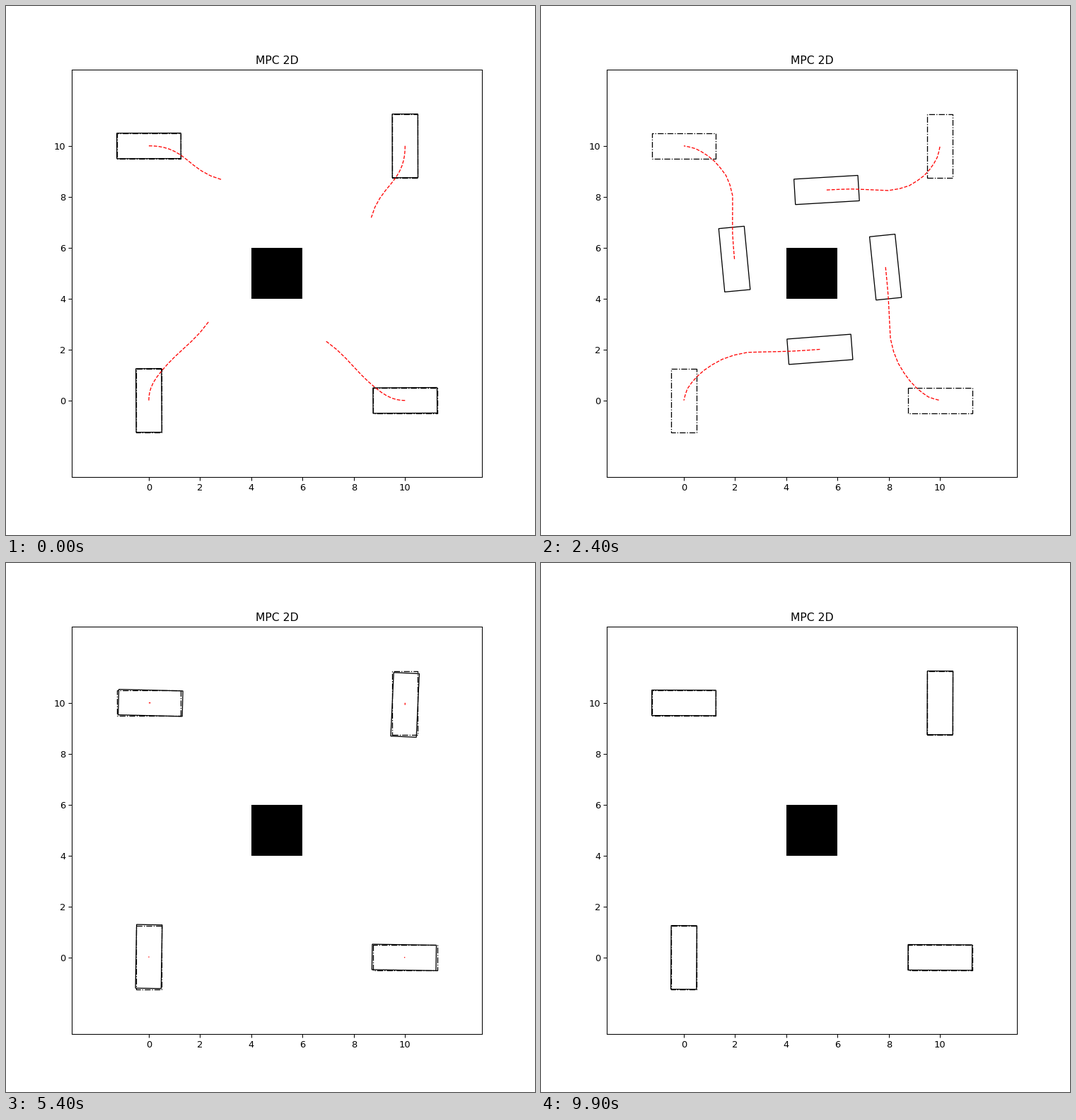
Write a matplotlib script that moves like this. It is 748 px wide and 748 px high and loops after 10000 ms.

```python
import numpy as np
import matplotlib.pyplot as plt
from matplotlib.animation import FuncAnimation

FRAMES, INTERVAL = 100, 100
STEPS = 14                       # planning horizon
KEYS = (0, 9, 18, 30)            # frames at which the plans are pinned
WIDTH, LENGTH = 1, 2.5
U = np.linspace(0, 1, STEPS + 1)


def quarter_turn(pose):
    """Rotate an (x, y, heading) pose by 90 degrees about the field's middle."""
    x, y, heading = pose
    return 10 - y, x, heading + 90


def spline(*poses):
    """Cubic Hermite curve through (x, y, heading) poses."""
    t = np.linspace(0, 1, 200)[:, None]
    parts = []
    for a, b in zip(poses, poses[1:]):
        p, q = np.array(a[:2], float), np.array(b[:2], float)
        pull = 1.15 * np.hypot(*(q - p))
        m, n = (pull * np.array([np.cos(h), np.sin(h)])
                for h in np.radians([a[2], b[2]]))
        parts.append(p + (q - p) * t * t * (3 - 2 * t)
                     + m * t * (1 - t)**2 - n * t * t * (1 - t))
    return np.vstack(parts)


def arc_length(points):
    return np.r_[0, np.cumsum(np.hypot(*np.diff(points, axis=0).T))]


def along(points, fractions):
    """Points at the given fractions of a curve's length."""
    s = arc_length(points)
    return np.column_stack([np.interp(fractions * s[-1], s, c) for c in points.T])


def sample(plan, index):
    """Plan at fractional steps; negative steps continue its first segment."""
    p = np.column_stack([np.interp(index, np.arange(STEPS + 1), c) for c in plan.T])
    return p + np.minimum(index, 0)[:, None] * (plan[1] - plan[0])


def box(**style):
    return ax.add_patch(plt.Rectangle((0, 0), WIDTH, LENGTH, fill=False,
                                      rotation_point="center", **style))


def place(patch, x, y, heading):
    patch.set_xy((x - WIDTH / 2, y - LENGTH / 2))
    patch.set_angle(heading - 90)


class Car:
    def __init__(self, start, cruise, swerve, approach, goal):
        self.finish = spline(approach, goal)
        self.decay = .052 * arc_length(self.finish)[-1]
        self.plans = [along(spline(*start), U**2),
                      along(spline(*cruise), .65 * U + .35 * U**2),
                      along(spline(*swerve, goal), U),
                      along(self.finish, 2 * U - U**2)]
        place(box(ls="dashdot"), *goal)
        self.body = box()
        self.route, = ax.plot([], [], "r--", lw=1)

    def plan(self, k):
        if k >= KEYS[-1]:
            done = 1 - np.exp(-self.decay * (k - KEYS[-1]))
            return along(self.finish, done + (1 - done) * U)
        n = max(i for i, key in enumerate(KEYS) if key <= k)
        w = (k - KEYS[n]) / (KEYS[n + 1] - KEYS[n])
        w = w * w * (3 - 2 * w)
        old, new = (sample(self.plans[m], (k - KEYS[m]) * (1 - U) + STEPS * U)
                    for m in (n, n + 1))
        return (1 - w) * old + w * new

    def draw(self, k):
        path = self.plan(k)
        dx, dy = np.diff(path[:3], axis=0).T
        first, second = np.unwrap(np.arctan2(dy, dx))
        place(self.body, *path[0], np.degrees(1.5 * first - .5 * second))
        self.route.set_data(*path.T)


fig, ax = plt.subplots(figsize=(8, 8), dpi=93.5)
fig.subplots_adjust(left=.1247, right=.8997)
ax.set(xlim=(-3, 13), ylim=(-3, 13), title="MPC 2D",
       xticks=range(0, 11, 2), yticks=range(0, 11, 2))
ax.add_patch(plt.Rectangle((4, 4), 2, 2, fc="k"))

upward = (
    [(0, 0, 90), (.55, 1.22, 50), (2.34, 3.1, 55)],
    [(.71, 1.575, 56), (3.8, 5.96, 46), (6.23, 7.88, 48)],
    [(2.42, 5.8, 80), (5.6, 8.64, 0), (8, 8.2, -3)],
)
downward = (
    [(10, 10, -90), (9.46, 8.52, -130), (8.68, 7.18, -105)],
    [(9.59, 8.69, -126), (5.87, 3.77, -126), (5.68, 3.16, -108)],
    [(7.36, 5.63, -110), (5.46, 2.58, -150), (2.64, 1.77, -170)],
)

# Each pair shares its manoeuvre, seen from two neighbouring corners.
cars = []
for legs, goal, approaches in (
        (upward, (10, 10, 90), [(8.22, 8.13, -2), (2.2, 8.32, 90)]),
        (downward, (0, 0, -90), [(2.67, 1.94, 169), (7.94, 2.55, -99)])):
    turned = [[quarter_turn(pose) for pose in leg] for leg in legs]
    cars.append(Car(*legs, approaches[0], goal))
    cars.append(Car(*turned, approaches[1], quarter_turn(goal)))


def draw(k):
    for car in cars:
        car.draw(k)


anim = FuncAnimation(fig, draw, frames=FRAMES, interval=INTERVAL, repeat=True,
                     repeat_delay=0)
plt.show()
```
